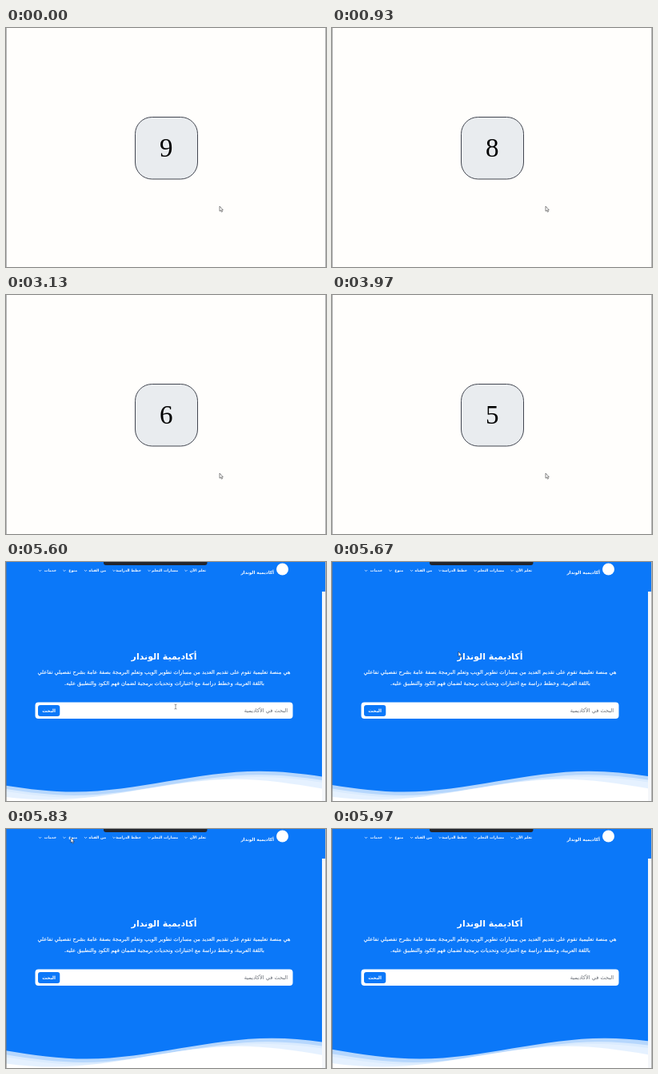
Animation, 400 px wide and 299 px high, one loop 6000 ms. Source, as an HTML page:

```html
<!DOCTYPE html>
<html lang="ar">
<head>
<meta charset="utf-8">
<title>Countdown</title>
<style>
  html, body { margin: 0; width: 100%; height: 100%; overflow: hidden; background: #fffefc; }
  svg { display: block; width: 400px; height: 299px; }
  #digit { font: 33px "Liberation Serif", "Times New Roman", serif; text-anchor: middle; }
  #page text { font-family: "DejaVu Sans", sans-serif; fill: #fff; direction: rtl; }
  #page .mid { text-anchor: middle; }
  #page .bold { font-weight: bold; }
  #page .nav { font-size: 4.6px; }
  #page .body { font-size: 6.65px; stroke: #fff; stroke-width: .15px; }
</style>
</head>
<body>
<svg viewBox="0 0 400 299">
  <defs>
    <path id="wave" d="M-160 44c30 0 58-18 88-18s58 18 88 18 58-18 88-18 58 18 88 18v44h-352z"/>
    <path id="arrow" d="M0 0V6.2L1.5 5L2.5 7.2L3.5 6.7L2.6 4.7H4.3Z" stroke-width=".7" stroke-linejoin="round"/>
    <clipPath id="hero"><rect width="395" height="299"/></clipPath>
  </defs>

  <g id="counter">
    <rect width="400" height="299" fill="#fffefc"/>
    <rect x="161.5" y="111.5" width="78" height="77.5" rx="21" fill="#e9ecef" stroke="#41454f"/>
    <text id="digit" x="200.3" y="161.3"></text>
    <use href="#arrow" x="267" y="223" fill="#fff" stroke="#555"/>
  </g>

  <g id="page">
    <rect width="400" height="299" fill="#0b78f9"/>
    <g id="waves" clip-path="url(#hero)" fill="#fff"></g>
    <rect x="395" y="37" width="5" height="262" fill="#f5f7fa"/>
    <path d="M122 0H251.5V1Q251.5 4 248.500 4H125Q122 4 122 1Z" fill="#22252c"/>

    <circle cx="345.5" cy="9" r="7.5" fill="#fff"/>
    <text class="bold" x="335" y="15" font-size="5.6">أكاديمية الوندار</text>
    <g id="menu"></g>

    <text class="mid bold" x="197.5" y="122" font-size="11">أكاديمية الوندار</text>
    <text class="mid body" x="197.5" y="140">هي منصة تعليمية تقوم على تقديم العديد من مسارات تطوير الويب وتعلم البرمجة بصفة عامة بشرح تفصيلي تفاعلي</text>
    <text class="mid body" x="198" y="154">باللغة العربية، وخطط دراسة مع اختبارات وتحديات برمجية لضمان فهم الكود والتطبيق عليه.</text>

    <rect x="36.5" y="175.5" width="322" height="20.5" rx="4" fill="#fff"/>
    <rect x="40" y="179" width="27.3" height="14" rx="3" fill="#0b78f9"/>
    <text class="mid bold" x="53.6" y="188.2" font-size="5.8">البحث</text>
    <text x="352" y="188.2" font-size="6.6" style="fill:#666b73">البحث في الأكاديمية</text>

    <path id="beam" d="M-1.5 -3Q0 -3 0 -2V2Q0 3 -1.5 3M1.5 -3Q0 -3 0 -2M0 2Q0 3 1.5 3" fill="none" stroke="#555" stroke-width=".6"/>
    <use id="pointer" href="#arrow" fill="#fff" stroke="#1c3a66"/>
  </g>

  <path d="M.5 0V299" stroke="#777" stroke-opacity=".55"/>
  <path d="M399.5 0V299" stroke="#b4b4b3"/>
</svg>
<script>
const LOOP = 6000, PAGE_AT = 5600;
const $ = id => document.getElementById(id);

// [start in ms, digit]
const digits = [[0, 9], [930, 8], [1930, 7], [3130, 6], [3930, 5]];

// Pointer places, one per step of about 33 ms
const track = [[212, 181], [186, 148], [158, 112], [130, 75], [107, 46],
               [95, 30], [87, 19], [81, 11], [77, 5], [74, 0], [72, -4]];

// [label, right edge, arrow x]
const menu = [
  ['تعلم الآن', 250, 225], ['مسارات التعلم', 215, 179], ['خطط الدراسة', 169, 135],
  ['من القناه', 125, 99.5], ['منوع', 89, 73], ['خدمات', 63, 42.5]
];

// [head start in s, period in s, drop, opacity]
const layers = [[2, 7, 0, .7], [3, 10, 3, .5], [4, 13, 5, .3], [5, 20, 7, 1]];
const WAVE_AGE = .34; // seconds the waves have run when the page appears

function add(parent, tag, attrs, text = '') {
  const el = document.createElementNS('http://www.w3.org/2000/svg', tag);
  for (const key in attrs) el.setAttribute(key, attrs[key]);
  el.textContent = text;
  return parent.appendChild(el);
}

for (const [label, right, x] of menu) {
  add($('menu'), 'text', { class: 'nav bold', x: right, y: 12 }, label);
  add($('menu'), 'path', {
    d: `M${x - 1.6} 10l1.6 1.6l1.6 -1.6`, fill: 'none', stroke: '#fff', 'stroke-width': .7
  });
}
const waves = layers.map(layer => add($('waves'), 'use', { href: '#wave', 'fill-opacity': layer[3] }));

const show = (el, on) => el.setAttribute('visibility', on ? 'inherit' : 'hidden');
const move = (el, [x, y]) => el.setAttribute('transform', `translate(${x} ${y})`);

function drawPage(ms) {
  const step = Math.floor((ms + 3.4) / 33.34);
  const at = track[step];
  show($('beam'), step === 0);
  show($('pointer'), step > 0 && at);
  if (at) move($(step ? 'pointer' : 'beam'), at);

  const age = WAVE_AGE + step / 30;
  layers.forEach(([head, period, drop], i) => {
    const shift = 175 * (age + head) / period - 42;
    waves[i].setAttribute('transform',
      `translate(0 259) scale(2.63 1.43) translate(${shift} ${drop - 24})`);
  });
}

function draw(now) {
  const t = now % LOOP, onPage = t >= PAGE_AT;
  show($('counter'), !onPage);
  show($('page'), onPage);
  if (onPage) drawPage(t - PAGE_AT);
  else $('digit').textContent = digits.findLast(([start]) => t >= start)[1];
}

const origin = performance.now();
function tick() {
  draw(performance.now() - origin);
  requestAnimationFrame(tick);
}
tick();
</script>
</body>
</html>
```
